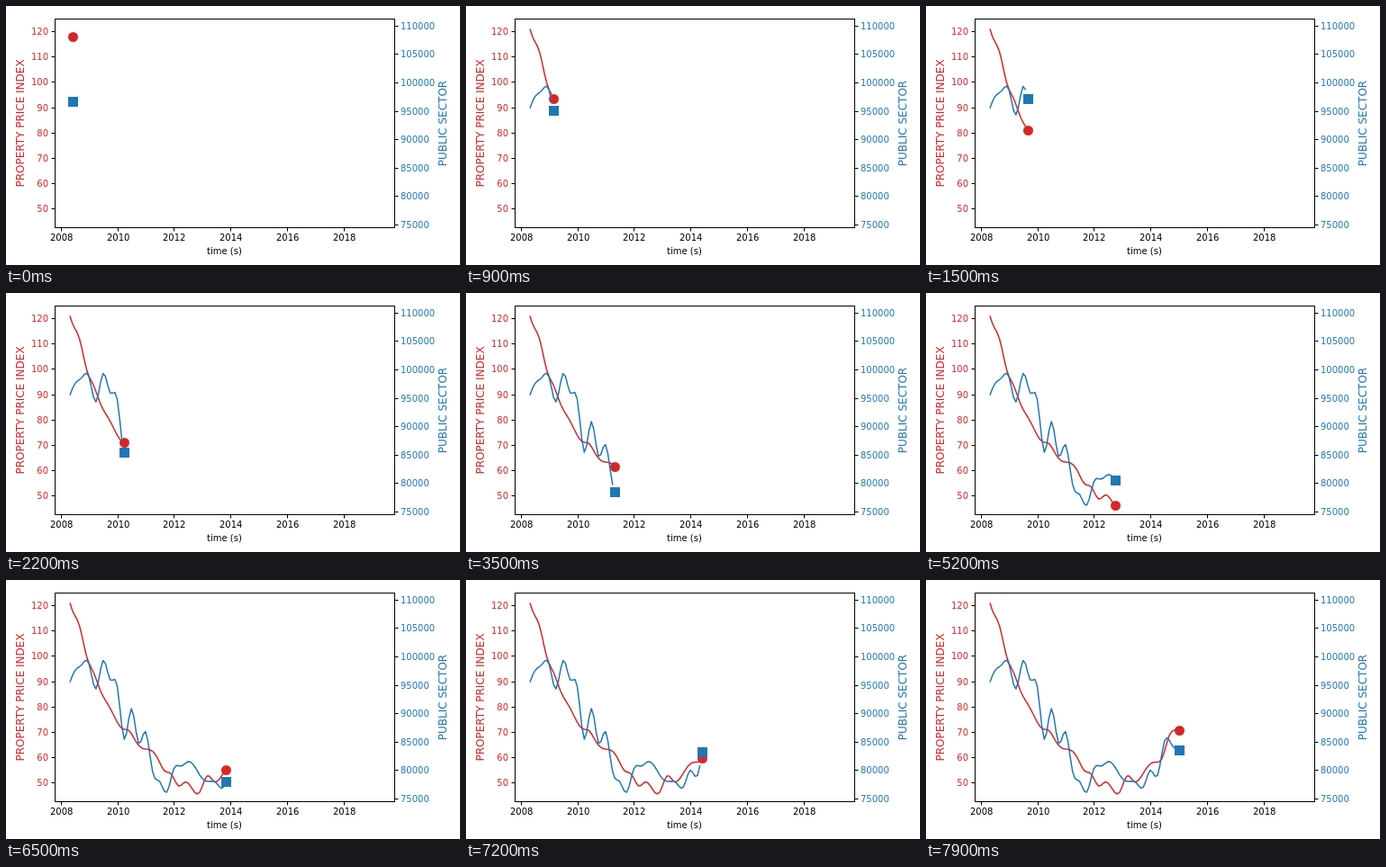
An HTML page that plays this animation: 504 px wide and 288 px high, repeating every 8000 ms.

```html
<!DOCTYPE html>
<html lang="en">
<head>
<meta charset="utf-8">
<title>Price index and public sector</title>
<style>
  html, body { margin: 0; width: 100%; height: 100%; overflow: hidden; background: #fff; }
  svg { display: block; width: 504px; height: 288px; }
  text { font: 10px "DejaVu Sans", sans-serif; }
  .title { font-size: 12px; }
  .middle { text-anchor: middle; }
  .end { text-anchor: end; }
  .red { fill: #d62728; }
  .blue { fill: #1f77b4; }
  polyline { fill: none; stroke-width: 1.5; stroke-linejoin: round; stroke-linecap: square; }
  .axis { fill: none; stroke: #000; stroke-width: 1; }
</style>
</head>
<body>
<svg viewBox="0 0 504 288">
  <polyline id="redLine" stroke="#d62728"/>
  <circle id="redDot" class="red" r="5.5"/>
  <polyline id="blueLine" stroke="#1f77b4"/>
  <rect id="blueDot" class="blue" x="-5.5" y="-5.5" width="11" height="11"/>
  <rect class="axis" x="54.5" y="14.5" width="377" height="232"/>
  <path id="ticks" class="axis"/>
  <g id="labels"></g>
  <text class="middle" x="242.5" y="276">time (s)</text>
  <text class="title red middle" transform="translate(19.5 130.5) rotate(-90)">PROPERTY PRICE INDEX</text>
  <text class="title blue middle" transform="translate(489 130.5) rotate(-90)">PUBLIC SECTOR</text>
</svg>
<script>
const STEP_MS = 100, STEPS = 80;
const $ = id => document.getElementById(id);
const snap = v => Math.floor(v) + 0.5;

// Natural cubic spline through evenly spaced heights
function spline(y) {
  const last = y.length - 1, s = y.map(() => 0);
  for (let pass = 0; pass < 40; pass++) {
    s[0] = (3 * (y[1] - y[0]) - s[1]) / 2;
    for (let j = 1; j < last; j++) s[j] = (3 * (y[j + 1] - y[j - 1]) - s[j - 1] - s[j + 1]) / 4;
    s[last] = (3 * (y[last] - y[last - 1]) - s[last - 1]) / 2;
  }
  return u => {
    const j = Math.min(Math.floor(u), last - 1), t = u - j, r = 1 - t;
    return r * r * ((1 + 2 * t) * y[j] + t * s[j]) + t * t * ((3 - 2 * t) * y[j + 1] - r * s[j + 1]);
  };
}

// One point per month from quarterly heights that begin `lead` months early
function series(name, lead, quarters) {
  const curve = spline(quarters);
  const pts = Array.from({ length: STEPS + 1 }, (_, i) => [71.15 + 2.617 * i, curve((i + lead) / 3)]);
  return { line: $(name + "Line"), dot: $(name + "Dot"), pts };
}

const plots = [
  series("red", 2, [
    5, 34, 51, 85, 103, 124, 138, 153, 165, 167.5, 180, 187.5, 189, 197.5, 212,
    216, 229, 224.5, 233, 236, 218, 224, 219, 207, 202.5, 198, 173, 167, 168
  ]),
  series("blue", 1, [
    121, 101, 94, 93, 121, 89.5, 111, 118, 177, 143, 181.5, 168.5, 213, 224,
    236, 210, 207, 202, 208, 220.5, 224, 225.5, 230.4, 211.5, 217.5, 179, 183, 189
  ])
];

function label(text, x, y, cls) {
  const el = document.createElementNS("http://www.w3.org/2000/svg", "text");
  el.setAttribute("x", x);
  el.setAttribute("y", y);
  el.setAttribute("class", cls);
  el.textContent = text;
  $("labels").append(el);
}

function drawAxes() {
  let d = "";
  for (let i = 0; i < 6; i++) {
    const x = snap(61.2 + 62.8 * i);
    d += `M${x} 247v3.5`;
    label(2008 + 2 * i, x + 0.2, 261, "middle");
  }
  for (let i = 0; i < 8; i++) {
    const left = snap(28.6 + 28.17 * i), right = snap(22.48 + 31.51 * i);
    d += `M54 ${left}h-3.5M432 ${right}h3.5`;
    label(120 - 10 * i, 47, left + 3.5, "red end");
    label(110000 - 5000 * i, 438, right + 3.5, "blue");
  }
  $("ticks").setAttribute("d", d);
}

// The marker runs one month ahead of the line
function draw(step) {
  for (const { line, dot, pts } of plots) {
    const [x, y] = pts[step + 1];
    line.setAttribute("points", step ? pts.slice(0, step + 1).join(" ") : "");
    dot.setAttribute("transform", `translate(${snap(x + 0.5)} ${snap(y + 0.5)})`);
  }
}

let shown = -1;
function frame() {
  const step = Math.floor(performance.now() / STEP_MS) % STEPS;
  if (step !== shown) draw(shown = step);
  requestAnimationFrame(frame);
}

drawAxes();
frame();
</script>
</body>
</html>
```
